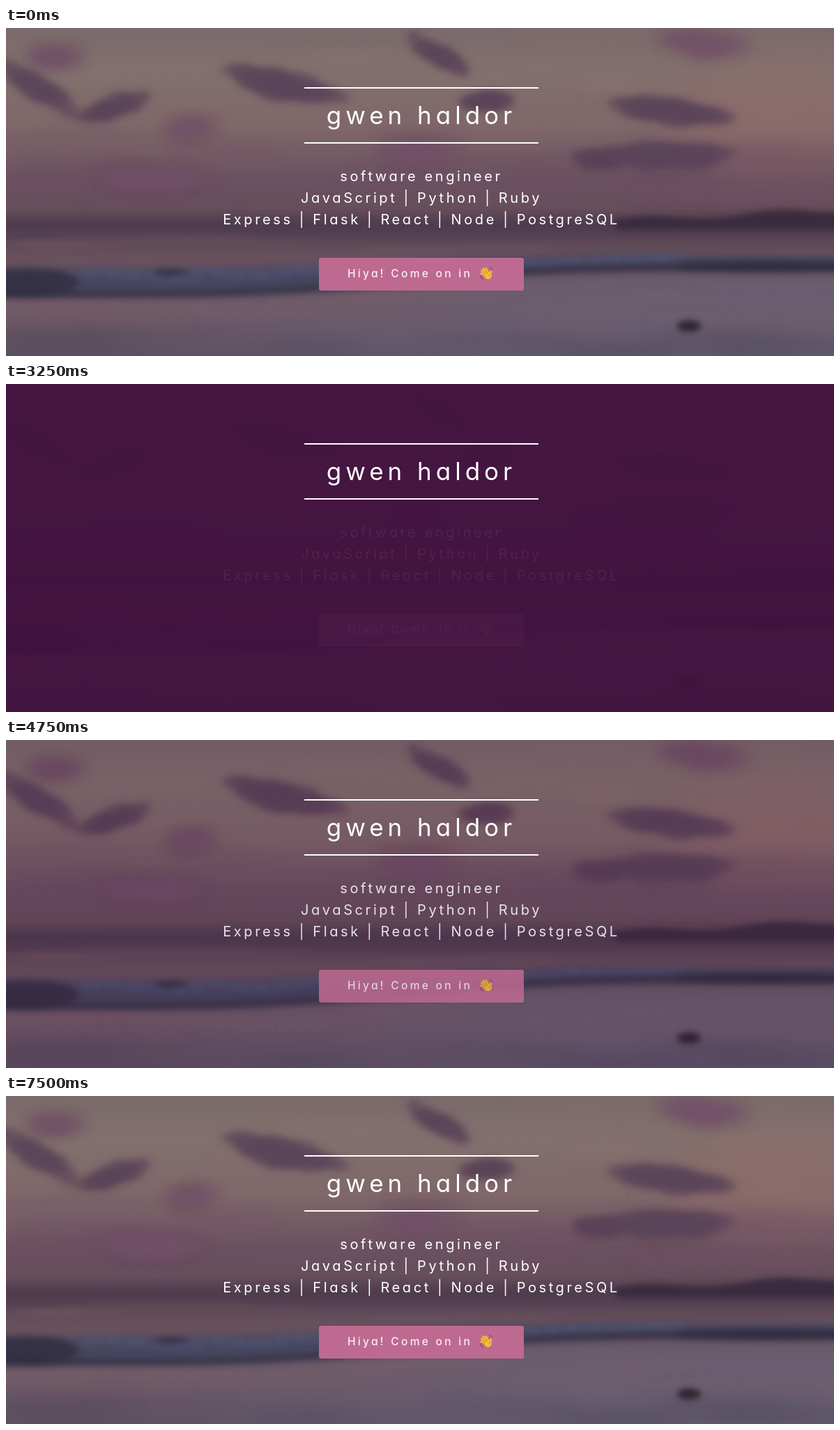
Recreate the animation shown at these times as an HTML page with a canvas. Size 1188 px wide and 471 px high, loop 8000 ms.

```html
<!DOCTYPE html>
<html lang="en">
<head>
<meta charset="utf-8">
<title>Intro banner</title>
<style>
  html, body { margin: 0; width: 100%; height: 100%; overflow: hidden; background: #41113f; }
  body { font: 400 20px/31px Inter, "Open Sans", sans-serif; font-feature-settings: "cv11"; color: #fff; }
  #stage { position: relative; width: 1188px; height: 471px; overflow: hidden; }
  #stage * { position: absolute; margin: 0; white-space: nowrap; }
  h1 {
    left: 428px; top: 85px; width: 336px; height: 81px;
    font-size: 35px; font-weight: 400; line-height: 81px;
    letter-spacing: 6px; text-align: center;
  }
  h1 i { height: 2px; background: #fff; }
  #top { left: 0; top: 0; }
  #bottom { right: 0; bottom: 0; }
  #details { left: 0; top: 0; width: 1188px; height: 471px; }
  #details p { left: 2px; top: 198px; width: 1188px; letter-spacing: 3.6px; text-align: center; white-space: pre-line; }
  #button {
    left: 449px; top: 330px; width: 294px; height: 47px; border-radius: 3px;
    background: #be6a90; color: #fbeef4; font-size: 15.5px; line-height: 45px; letter-spacing: 3.3px;
  }
  #button b { left: 41px; font-weight: 500; }
  #button svg { left: 230px; top: 12px; }
</style>
</head>
<body>
<div id="stage">
  <canvas id="sea" width="1188" height="471"></canvas>
  <h1 id="title">gwen haldor<i id="top"></i><i id="bottom"></i></h1>
  <div id="details">
    <p>software engineer<br>JavaScript | Python | Ruby<br>Express | Flask | React | Node | PostgreSQL</p>
    <div id="button">
      <b>Hiya! Come on in</b>
      <svg width="20" height="20" fill="none" stroke-linecap="round">
        <path d="M15 1.5q3 1 3.5 4M1.5 14q1 3.5 4 4.5" stroke="#79506f" stroke-width="1.2"/>
        <path d="M10 13L3 10.5M10 11L3.5 6.5M11 10L6 3.5M13 10L10 3.5M15 13L17 7.5" stroke="#f6bd38" stroke-width="2.9"/>
        <circle cx="12.5" cy="13.2" r="5.4" fill="#f6bd38"/>
        <path d="M5 9.3L9 11.8M6 6.5L10.5 10.7M9 4.8L12 9.7M14.5 14Q14.5 11.5 16 10.5" stroke="#bd7927" stroke-width=".8"/>
      </svg>
    </div>
  </div>
</div>
<script>
const LOOP = 8000, STEP = 250;
const byId = id => document.getElementById(id);
const [sea, title, topLine, bottomLine, details] =
  ["sea", "title", "top", "bottom", "details"].map(byId);

// CSS-style cubic bezier, solved by bisection
function bezier(x1, y1, x2, y2) {
  const at = (a, b, u) => 3 * a * u * (1 - u) ** 2 + 3 * b * u * u * (1 - u) + u ** 3;
  return x => {
    let low = 0, high = 1;
    for (let i = 0; i < 24; i++) {
      const mid = (low + high) / 2;
      if (at(x1, x2, mid) < x) low = mid; else high = mid;
    }
    return at(y1, y2, low);
  };
}
const ease = bezier(.25, .1, .25, 1);
const easeInOut = bezier(.42, 0, .58, 1);

function progress(t, start, duration, curve) {
  const x = (t - start) / duration;
  return x <= 0 ? 0 : x >= 1 ? 1 : curve(x);
}

function paintSea() {
  const c = sea.getContext("2d"), W = 1188, H = 471;
  let seed = 7;
  const random = () => (seed = seed * 16807 % 2147483647) / 2147483647;
  const between = (low, high) => low + (high - low) * random();

  function brush(blur, color, alpha) {
    c.filter = `blur(${blur}px)`;
    c.fillStyle = color;
    c.globalAlpha = alpha;
  }
  function oval(x, y, rx, ry) {
    c.beginPath();
    c.ellipse(x, y, rx, ry, 0, 0, 7);
    c.fill();
  }
  // Long flat wisps scattered over a horizontal band
  function streaks(count, top, bottom, length, thickness) {
    for (let i = 0; i < count; i++) {
      oval(between(0, W), between(top, bottom), length * between(.5, 1.5), thickness * between(.5, 1.5));
    }
  }
  // Puffs along a sloping line, largest in its middle
  function cloud(x, y, reach, slope) {
    for (let u = -1; u <= 1; u += .125) {
      const size = 6 + reach * .2 * (1 - u * u);
      oval(x + u * reach, y + u * reach * slope + between(-5, 5), size * 1.3, size * between(.5, 1));
    }
  }
  function ridge(from, top, bottom) {
    c.beginPath();
    for (let x = from; x <= W + 30; x += 10) c.lineTo(x, top(x));
    for (let x = W + 30; x >= from; x -= 10) c.lineTo(x, bottom(x));
    c.fill();
  }

  // Sky down to the horizon, then sea and sand
  const base = c.createLinearGradient(0, 0, 0, H);
  [[0, "#7a6a6b"], [.13, "#83706e"], [.3, "#7f676a"], [.46, "#6c5161"], [.55, "#674e5b"],
   [.6, "#534051"], [.69, "#67505c"], [.85, "#735b67"], [1, "#5c5162"]]
    .forEach(([at, color]) => base.addColorStop(at, color));
  c.fillStyle = base;
  c.fillRect(0, 0, W, H);

  brush(35, "#98706d", .5);
  oval(1110, 130, 150, 70);
  brush(9, "#8d7472", .25);
  streaks(16, 0, 150, 90, 8);
  brush(8, "#704f63", .25);
  streaks(22, 150, 250, 110, 8);
  brush(9, "#74536a", .5);
  [[70, 40, 35, 0], [1000, 22, 60, .1], [265, 145, 30, -.1], [590, 178, 50, 0], [210, 215, 70, .05]]
    .forEach(bank => cloud(...bank));
  brush(6, "#5d455a", .6);
  [[45, 85, 55, .7], [155, 112, 45, -.3], [400, 82, 85, .25], [620, 38, 38, .6], [690, 104, 32, 0],
   [955, 120, 85, .15], [850, 187, 30, 0], [950, 182, 90, 0]]
    .forEach(bank => cloud(...bank));

  // Dark water at the horizon and the headland
  brush(7, "#4a374c", .4);
  ridge(-30, () => 272, () => 302);
  brush(4, "#382a3d", .9);
  ridge(870, x => 277 - (x - 870) * .05 - 4 * Math.sin((x - 870) / 30), () => 289);
  brush(5, "#7a5c67", .35);
  streaks(12, 300, 335, 100, 3);

  // Sand with cool reflections toward the right
  const cool = c.createLinearGradient(0, 0, W, 0);
  cool.addColorStop(.1, "#67607400");
  cool.addColorStop(.7, "#676074");
  brush(10, cool, .7);
  c.fillRect(-30, 358, W + 60, H);
  brush(7, "#80636c", .25);
  streaks(16, 385, 430, 120, 5);
  brush(9, "#504a5e", .25);
  streaks(16, 430, H, 110, 6);

  // The wave climbs and thins toward the right
  const climb = x => easeInOut(Math.min(1, Math.max(0, (x - 200) / 750)));
  const crest = x => 346 - 20 * climb(x);
  const foot = x => 386 - 38 * climb(x);
  brush(6, "#444660", .9);
  ridge(-30, crest, foot);
  brush(5, "#566080", .35);
  for (let x = 110; x < 980; x += 30) oval(x, crest(x) + between(4, 14), 28, 5);
  brush(5, "#2e2a3c", .7);
  ridge(-30, x => foot(x) - 9, foot);
  oval(30, 365, 75, 20);
  oval(235, 351, 24, 5);
  oval(1090, 342, 130, 7);

  brush(4, "#29242e", .95);
  oval(980, 428, 17, 8);
}

function render(t) {
  const shown = t < STEP;
  const heading = shown ? 1 : progress(t, 1350, 750, ease);
  const rule = shown ? 1 : progress(t, 1620, 850, ease);
  const reveal = shown ? 1 : progress(t, 2800, 2650, easeInOut);
  title.style.opacity = heading;
  title.style.transform = `scale(${.95 + .05 * heading})`;
  topLine.style.width = bottomLine.style.width = `${rule * 100}%`;
  sea.style.opacity = details.style.opacity = reveal;
}

function tick() {
  const t = performance.now() % LOOP;
  render(Math.floor(t / STEP) * STEP);
  requestAnimationFrame(tick);
}

paintSea();
tick();
</script>
</body>
</html>
```
